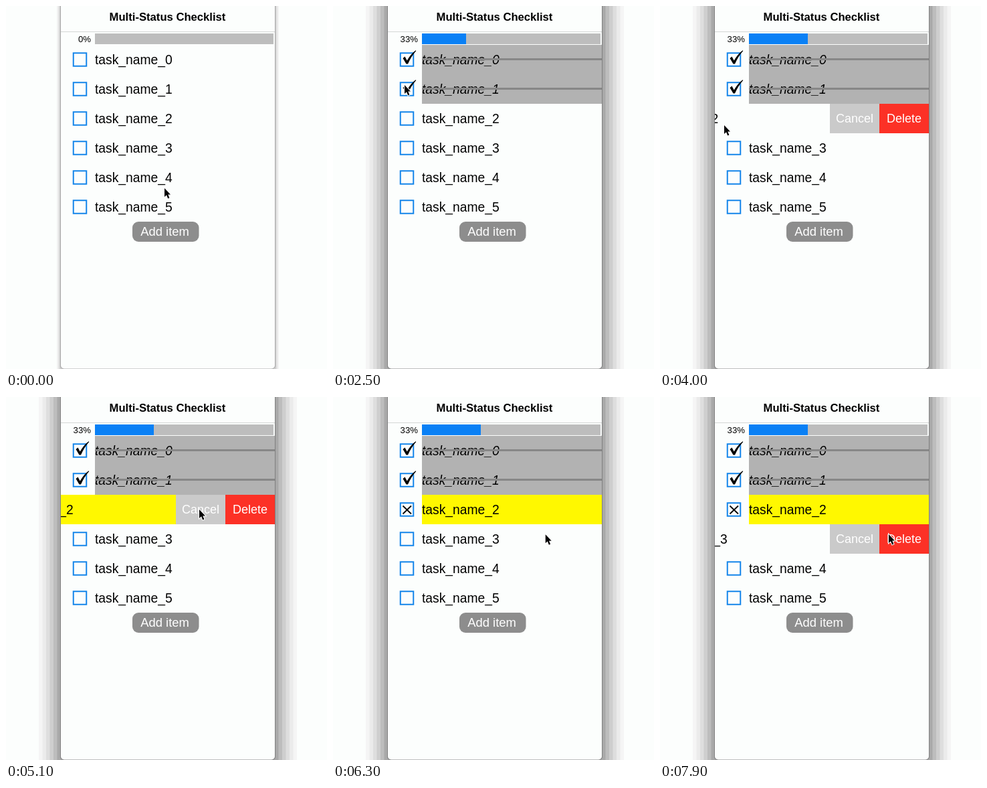
An HTML page with a canvas for the animation above (8 s loop, 480x542 px).

```html
<!DOCTYPE html>
<html lang="en">
<head>
<meta charset="utf-8">
<title>Multi-Status Checklist</title>
<style>
  html, body { margin: 0; overflow: hidden; background: #fcfefd; }
  canvas { display: block; }
</style>
</head>
<body>
<canvas id="stage" width="480" height="542"></canvas>
<script>
const ctx = document.getElementById('stage').getContext('2d');
const FONT = '"Liberation Sans", Arial, sans-serif';
const WIDTH = 480, HEIGHT = 542, LOOP = 8000, STEP = 100;
const LEFT = 82, RIGHT = 402, TEXT_X = 133, ROW_H = 44, BUTTON_W = 74;
const ACTIONS = 2 * BUTTON_W;
const PAPER = '#fcfefd', BLUE = '#0a80f5', CHECKED_AT = [1100, 2350], CANCELLED_AT = 5100;

const CHECK = new Path2D('M-6 -2 L-3 -4.5 L.2 1.5 Q5 -7.5 13 -13.8 L13.8 -13 Q6.5 -5 1.5 6.5 H-1Z');
const CROSS = new Path2D('M-6 -5.5 L6.5 6.5 M6.5 -5.5 L-6 6.5');
const ARROW = new Path2D('M0 0 V13 L3 10.3 L5.2 15.5 L7.4 14.5 L5.3 9.4 H9Z');

const MOVES = [
  { from: 0, to: 800, x: 112, y: 86 },
  { from: 1700, to: 2300, x: 107, y: 118 },
  { from: 2600, to: 3100, x: 271, y: 185 },
  { from: 3200, to: 4000, x: 96, y: 178 },
  { from: 4100, to: 4600, x: 289, y: 168 },
  { from: 5600, to: 6400, x: 319, y: 207 },
  { from: 6480, to: 7300, x: 97, y: 209 },
  { from: 7400, to: 7900, x: 342, y: 205 }
];
// Rows swiped open, with the x where each was grabbed.
const SWIPES = {
  2: { from: 3200, to: 4000, grab: 271 },
  3: { from: 6500, to: 7300, grab: 319 }
};

const ramp = (t, from, to) => Math.min(1, Math.max(0, (t - from) / (to - from)));
const ease = p => p * p * (3 - 2 * p);
const mix = (a, b, p) => a + (b - a) * p;

function pointerAt(t) {
  let x = 237, y = 272;
  for (const move of MOVES) {
    const p = ease(ramp(t, move.from, move.to));
    x = mix(x, move.x, p);
    y = mix(y, move.y, p);
  }
  return { x, y };
}

// Dragging past the action buttons meets resistance, then springs back.
function rowOffset(i, t) {
  const swipe = SWIPES[i];
  if (!swipe || t < swipe.from) return 0;
  const drag = Math.max(0, swipe.grab - pointerAt(Math.min(t, swipe.to)).x);
  const pulled = drag < ACTIONS ? drag : mix(drag, ACTIONS, 0.5);
  const open = mix(pulled, ACTIONS, ramp(t, swipe.to, swipe.to + 200));
  const closed = i === 2 ? ease(ramp(t, CANCELLED_AT, CANCELLED_AT + 400)) : 0;
  return -open * (1 - closed);
}

function rect(color, x, y, w, h) {
  ctx.fillStyle = color;
  ctx.fillRect(x, y, w, h);
}

function panel(color, x, y, w, h, radius) {
  ctx.fillStyle = color;
  ctx.beginPath();
  ctx.roundRect(x, y, w, h, radius);
  ctx.fill();
}

function label(text, x, y, size, { color = '#000', align = 'left', style = '' } = {}) {
  ctx.font = `${style} ${size}px ${FONT}`;
  ctx.textAlign = align;
  ctx.fillStyle = color;
  ctx.fillText(text, x, y);
}

function stroke(path, color, width) {
  ctx.strokeStyle = color;
  ctx.lineWidth = width;
  ctx.stroke(path);
}

function phone(focused) {
  const bands = focused ? 6 : 3, reach = focused ? 33 : 6, dark = focused ? 82 : 45;
  const w = RIGHT - LEFT;
  for (let i = 1; i <= bands; i++) {
    const v = Math.round(251 - dark * (i / bands) ** 1.5);
    const spread = reach * (1 - (i - 1) / bands);
    rect(`rgb(${v},${v},${v})`, LEFT - spread, 0, w + 2 * spread, HEIGHT);
  }
  panel(focused ? '#808080' : '#aaa', LEFT - 1, -9, w + 2, HEIGHT + 9, 5);
  panel(PAPER, LEFT, -9, w, HEIGHT + 8.5, 5);
}

function header(t) {
  label('Multi-Status Checklist', 241.5, 22, 16.65, { align: 'center', style: 'bold' });
  rect('#d4d6d5', LEFT, 38, RIGHT - LEFT, 1);
  const checked = CHECKED_AT.filter(at => t >= at).length;
  label(Math.floor(checked * 100 / 6) + '%', 127, 54, 13.2, { align: 'right' });
  rect('#bdbdbd', TEXT_X, 41, 267, 16);
  const filled = CHECKED_AT.reduce((sum, at) => sum + ramp(t, at, at + 300), 0);
  rect(BLUE, TEXT_X, 41, filled * 44, 16);
}

function action(text, color, x, y) {
  rect(color, x, y - ROW_H / 2, BUTTON_W, ROW_H);
  label(text, x + BUTTON_W / 2, y + 6, 18, { color: '#fff', align: 'center' });
}

function row(i, t) {
  const y = 80 + ROW_H * i, top = y - ROW_H / 2, offset = rowOffset(i, t);
  const done = t >= CHECKED_AT[i];
  const cancelled = i === 2 && t >= CANCELLED_AT;

  if (offset) {
    action('Cancel', '#cacaca', RIGHT - ACTIONS, y);
    action('Delete', '#fc3126', RIGHT - BUTTON_W, y);
  }
  ctx.save();
  ctx.translate(offset, 0);
  rect(PAPER, LEFT, top, RIGHT - LEFT, ROW_H);
  if (done || cancelled) rect(done ? '#b2b2b2' : '#fff800', TEXT_X, top, RIGHT - TEXT_X, ROW_H);
  label('task_name_' + i, TEXT_X, y + 7, 19.3, { style: done ? 'italic' : '' });
  if (done) rect('#878787', TEXT_X, y - 2, RIGHT - TEXT_X, 3);
  ctx.translate(110.5, y);
  ctx.strokeStyle = '#1485ea';
  ctx.lineWidth = 2;
  ctx.strokeRect(-9.75, -9.75, 19.5, 19.5);
  ctx.fillStyle = '#000';
  if (done) ctx.fill(CHECK);
  if (cancelled) stroke(CROSS, '#000', 1.8);
  ctx.restore();
}

function addButton() {
  panel('#8d8d8d', 189, 322, 99.5, 30, 9);
  label('Add item', 237.5, 343, 18.4, { color: '#fff', align: 'center' });
}

function pointer(t) {
  const { x, y } = pointerAt(t);
  const pressed = Object.values(SWIPES).some(s => t >= s.from - 100 && t < s.to - 50);
  ctx.save();
  ctx.translate(x, y);
  if (pressed) {
    const ring = new Path2D();
    ring.arc(0, 3, 21.3, 0, 2 * Math.PI);
    stroke(ring, '#000', 3);
  }
  stroke(ARROW, '#fff', 2);
  ctx.fillStyle = '#000';
  ctx.fill(ARROW);
  ctx.restore();
}

function draw(t) {
  rect(PAPER, 0, 0, WIDTH, HEIGHT);
  phone(t >= CHECKED_AT[0]);
  ctx.save();
  ctx.beginPath();
  ctx.rect(LEFT, 0, RIGHT - LEFT, HEIGHT);
  ctx.clip();
  header(t);
  for (let i = 0; i < 6; i++) row(i, t);
  addButton();
  ctx.restore();
  pointer(t);
}

const start = performance.now();
function tick() {
  const t = (performance.now() - start) % LOOP;
  draw(Math.floor((t + 10) / STEP) * STEP % LOOP);
  requestAnimationFrame(tick);
}
tick();
</script>
</body>
</html>
```
